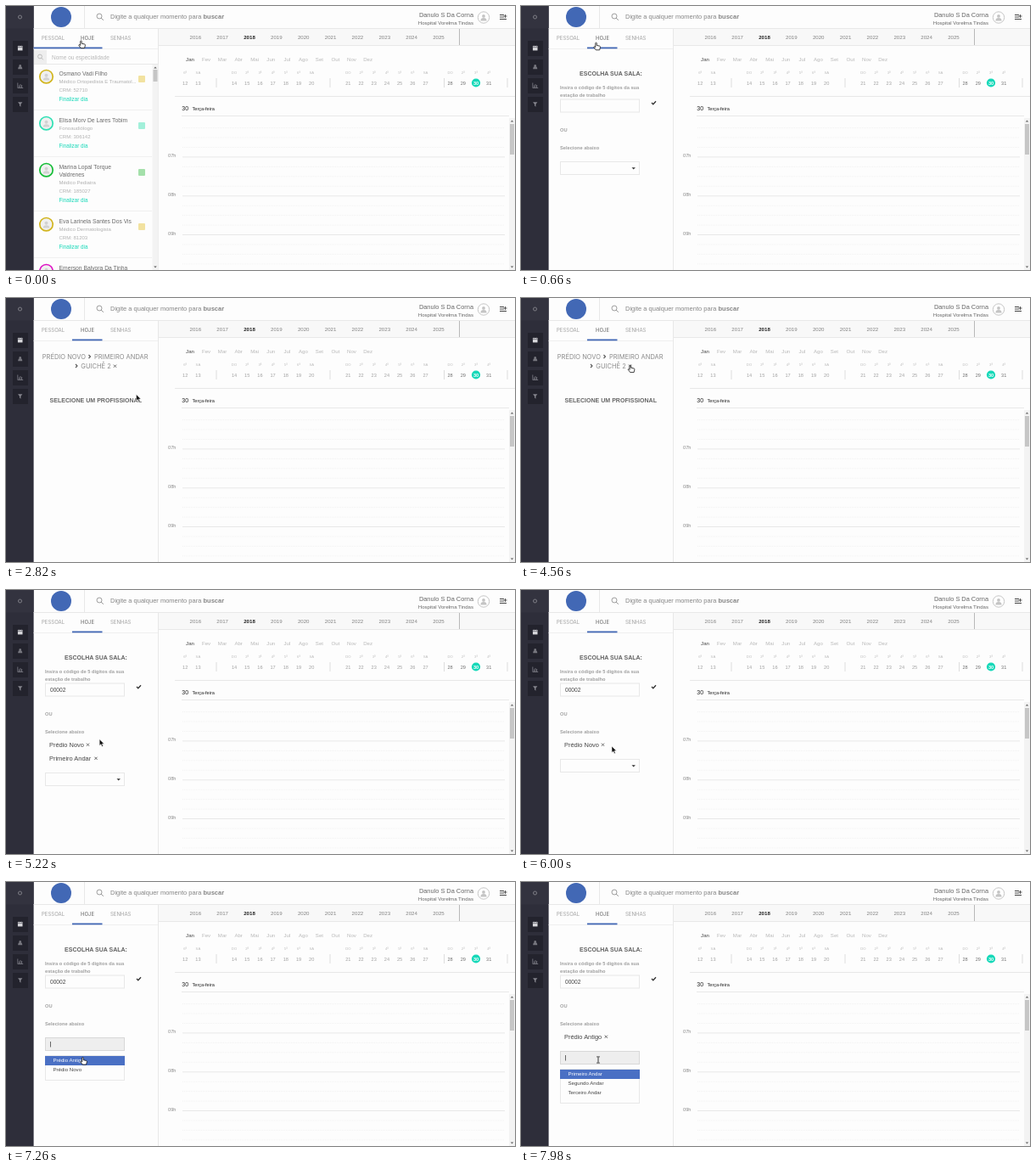
An HTML page that plays this animation: 600 px wide and 311 px high, repeating every 8000 ms.

```html
<!DOCTYPE html>
<html lang="pt-BR">
<head>
<meta charset="utf-8">
<title>Agenda</title>
<style>
  html, body { margin: 0; width: 100%; height: 100%; overflow: hidden; background: #fdfdfd; }
  svg { display: block; width: 100%; height: 100%; font-family: "Liberation Sans", Arial, sans-serif; }
</style>
</head>
<body>
<svg id="stage" viewBox="0 0 600 311">
  <g id="base"></g>
  <g id="panel"></g>
  <rect id="ink" y="48.5" height="1.8" fill="#4268b5"/>
  <g id="cursor"></g>
</svg>
<script>
const LOOP = 8000;
const BLUE = '#4268b5', TEAL = '#14d8b8', RULE = '#e8e8e8', FAINT = '#f0f0f0';
const $ = id => document.getElementById(id);

// ---- markup helpers ----
const text = (x, y, size, fill, str, extra = '') =>
  `<text x="${x}" y="${y}" font-size="${size}" fill="${fill}" ${extra}>${str}</text>`;
const rect = (x, y, w, h, fill, extra = '') =>
  `<rect x="${x}" y="${y}" width="${w}" height="${h}" fill="${fill}" ${extra}/>`;
const path = (d, stroke, width = 1, fill = 'none', extra = '') =>
  `<path d="${d}" stroke="${stroke}" stroke-width="${width}" fill="${fill}" ${extra}/>`;
const circle = (x, y, r, fill, extra = '') =>
  `<circle cx="${x}" cy="${y}" r="${r}" fill="${fill}" ${extra}/>`;
const shape = (d, fill) => path(d, 'none', 0, fill);
const range = (n, fn) => Array.from({ length: n }, (_, i) => fn(i)).join('');
const MID = 'text-anchor="middle"', END = 'text-anchor="end"', BOLD = 'font-weight="700"';
const WIDE = 'font-family="Inter, sans-serif"';

const cross = (x, y) => path(`M${x - 1.6} ${y - 1.6}l3.2 3.2m0 -3.2l-3.2 3.2`, '#666', 1);
const chevron = (x, y) => path(`M${x - 1} ${y - 2}l2 2l-2 2`, '#555', 1.1);
const lens = (x, y, r, color) =>
  circle(x, y, r, 'none', `stroke="${color}" stroke-width=".8"`) +
  path(`M${x + r * .7} ${y + r * .7}l${r * .9} ${r * .9}`, color, .9);
const person = (x, y, s, color) =>
  circle(x, y - 1.6 * s, 1.9 * s, color) +
  shape(`M${x - 3.6 * s} ${y + 4 * s}q0 -3.4 ${3.6 * s} -3.4t${3.6 * s} 3.4z`, color);
const scrollbar = (x, top, thumbY, thumbH) =>
  rect(x, top, 7, 311 - top, '#f3f3f3') + rect(x + 1, thumbY, 5, thumbH, '#c6c6c6') +
  shape(`M${x + 1.7} ${top + 4.5}h3.6l-1.8 -2zM${x + 1.7} 306.5h3.6l-1.8 2z`, '#666');

// ---- fixed parts ----
function sidebar() {
  return rect(0, 0, 32.6, 311, '#2e2e3a') + rect(0, 0, 32.6, 26.5, '#33333f') +
    circle(16.5, 13, 2, 'none', 'stroke="#808088" stroke-width="1"') +
    range(4, i => rect(8, 41 + 22 * i, 18, 18, '#23232d')) +
    rect(13.9, 47, 5.6, 5.4, '#d8d8dc') + path('M13.9 48.6h5.6M15.2 45.8v2M18.2 45.8v2', '#55555f', .7) +
    person(16.7, 71.5, .7, '#77777f') +
    path('M13.8 90.5v6h6.4M15.4 96v-2.5M17 96v-4M18.6 96v-3', '#77777f', .9) +
    shape('M14 113.2h5.4l-2 2.5v3l-1.4 -1.1v-1.9z', '#85858d');
}

function header() {
  return path('M32.6 26.5H600M92.5 0V26', RULE) +
    circle(65, 13, 12, BLUE) +
    lens(110, 12, 3, '#888') +
    text(123, 15.2, 7.53, '#858585', `Digite a qualquer momento para <tspan ${BOLD}>buscar</tspan>`) +
    text(551, 13, 7.4, '#666', 'Danulo S Da Corna', END) +
    text(551, 22, 6.05, '#666', 'Hospital Vorelma Tindas', END) +
    circle(563, 13.5, 6.7, '#fff', 'stroke="#b8b8b8" stroke-width=".8"') +
    person(563, 13.5, 1, '#c4c4c4') +
    path('M582 10.5h5M582 13h5M582 15.5h8', '#444') + path('M586.5 12h4M588.5 10v4', '#444', .9);
}

function tabs() {
  return text(42, 40.3, 6, '#a0a0a0', 'PESSOAL', WIDE) +
    text(88, 40.3, 6, '#666', 'HOJE', WIDE) +
    text(123, 40.3, 6, '#a0a0a0', 'SENHAS', WIDE) +
    path('M32.6 50.5H179', FAINT) + path('M179.5 27V311', RULE);
}

function week(x, firstDay, names, color) {
  return names.map((name, i) => {
    const cx = x + 15.2 * i, day = firstDay + i, today = day === 30;
    return text(cx, 79.5, 4.2, '#bbb', name, MID) +
      (today ? circle(cx, 90.5, 5.1, TEAL) : '') +
      text(cx, 92.6, 5.6, today ? '#fff' : color, day, MID + (today ? ' ' + BOLD : ''));
  }).join('');
}

function calendar() {
  const months = 'Jan Fev Mar Abr Mai Jun Jul Ago Set Out Nov Dez'.split(' ');
  const days = ['DO', '2ª', '3ª', '4ª', '5ª', '6ª', 'SÁ'];
  return rect(180, 27, 420, 19, '#f8f8f8') + path('M180 46.5H600', RULE) +
    range(10, i => text(223.3 + 31.85 * i, 39.3, 6.1, i === 2 ? '#222' : '#808080', 2016 + i,
      MID + (i === 2 ? ' ' + BOLD : ''))) +
    path('M534.5 27V46', '#b8b8b8') +
    months.map((m, i) => text(217 + 19.05 * i, 65.2, 6.1, i ? '#b8b8b8' : '#444', m, MID)).join('') +
    week(211.2, 12, days.slice(5), '#a0a0a0') + week(269, 14, days, '#a0a0a0') +
    week(403.3, 21, days, '#a0a0a0') + week(523.6, 28, days.slice(0, 4), '#707070') +
    path('M248 85v11M382 85v11M516.5 85v11M591 85v11', '#ddd') +
    path('M199 106.5H600', RULE) +
    text(207.3, 123, 7, '#222', '30') + text(219.5, 122.8, 5.6, '#222', 'Terça-feira') +
    path('M207 129.5H593', RULE);
}

function schedule() {
  return range(15, i => {
      const y = 143.6 + 11.45 * i, hour = i % 4 === 3;
      return path(`M208 ${y.toFixed(1)}H588`, hour ? RULE : '#ececec', hour ? 1 : .7, 'none',
        hour ? '' : 'stroke-dasharray="1 1"');
    }) +
    range(3, i => text(200.5, 178.2 + 45.9 * i, 5.7, '#888', `0${7 + i}h`, END)) +
    scrollbar(593, 132, 139, 36);
}

// ---- left panel contents ----
function professional(y, ring, tint, names, role, crm) {
  const below = y + 9 * (names.length - 1);
  return circle(47.5, y + 15.2, 7.7, '#f0f0f0', `stroke="${ring}" stroke-width="1.7"`) +
    person(47.5, y + 15.4, 1.05, '#d2d2d2') +
    names.map((n, i) => text(62.5, y + 13.6 + 9 * i, 6.75, '#6c6c6c', n)).join('') +
    text(62.5, below + 22.8, 6, '#b0b0b0', role) +
    text(62.5, below + 32.8, 6, '#b0b0b0', 'CRM: ' + crm) +
    text(62.5, below + 43.7, 6.3, TEAL, 'Finalizar dia') +
    rect(156, y + 14, 8, 8, tint, 'rx="1"') +
    path(`M33 ${below + 54.5}H172`, FAINT);
}

function professionals() {
  return rect(33, 52, 15, 16, '#eee') + lens(40, 59.5, 2.4, '#b0b0b0') +
    text(54, 62.5, 6.5, '#b8b8b8', 'Nome ou especialidade') + path('M33 68.5H179', RULE) +
    professional(68, '#d2b51e', '#f2e2a0', ['Osmano Vadi Filho'], 'Médico Ortopedista E Traumatol...', '52710') +
    professional(123, '#2ee0b4', '#a2f0da', ['Elisa Morv De Lares Tobim'], 'Fonoaudiólogo', '306142') +
    professional(178, '#14bd36', '#a4e0aa', ['Marina Lopal Torque', 'Valdrenes'], 'Médico Pediatra', '185027') +
    professional(242, '#d2b51e', '#f2e2a0', ['Eva Larinela Santes Dos Vis'], 'Médico Dermatologista', '81203') +
    professional(297, '#de14c4', '#f0a4e4', ['Emerson Balvora Da Tinha'], '', '') +
    scrollbar(172.5, 69, 75, 14);
}

const field = (y, focused) =>
  rect(46.5, y + .5, 93, 15, focused ? '#eee' : '#fdfdfd', `stroke="${focused ? '#d8d8d8' : RULE}"`);

function options(y, items) {
  return rect(46.5, y - .5, 93, 11 * items.length + 7, '#fdfdfd', `stroke="${RULE}"`) +
    rect(46, y, 94, 11, '#4a70c4') +
    items.map((item, i) => text(55.5, y + 7.4 + 11 * i, 6.1, i ? '#444' : '#fff', item)).join('');
}

function roomForm({ code = '', typing = false, tags = [], picking = false, items = [] } = {}) {
  const top = 183 + 16 * tags.length;
  return text(106, 82, 7, '#606060', 'ESCOLHA SUA SALA:', `${MID} ${BOLD}`) +
    text(46, 97.5, 5.7, '#a0a0a0', 'Insira o código de 5 dígitos da sua', BOLD) +
    text(46, 106.6, 5.7, '#a0a0a0', 'estação de trabalho', BOLD) +
    field(109.5, typing) + text(52, 120, 6.6, '#444', code) +
    path('M154 114l1.8 1.8l3.2 -3.6', '#333', 1.3) +
    text(46, 148, 5.7, '#a0a0a0', 'OU', BOLD) +
    text(46, 169, 5.7, '#a0a0a0', 'Selecione abaixo', BOLD) +
    tags.map(([label, x], i) => text(51, 184.6 + 16 * i, 7.45, '#444', label) + cross(x, 182.3 + 16 * i)).join('') +
    field(top, picking) +
    (picking ? path(`M52.5 ${top + 5}v6.5`, '#444', .8)
             : shape(`M130.5 ${top + 7.2}h4.4l-2.2 2.4z`, '#333')) +
    (items.length ? options(top + 22, items) : '');
}

function chosenRoom() {
  const crumb = (x, y, str) => text(x, y, 7.5, '#8a8a8a', str, WIDE);
  return crumb(42.8, 71.6, 'PRÉDIO NOVO') + chevron(98.5, 69) + crumb(104, 71.6, 'PRIMEIRO ANDAR') +
    chevron(83, 80) + crumb(88.3, 82.6, 'GUICHÊ 2') + cross(128.5, 80.2) +
    text(105.8, 122.5, 7.05, '#666', 'SELECIONE UM PROFISSIONAL', `${MID} ${BOLD}`);
}

// ---- timeline: [start ms, value] ----
const code = '00002';
const newBuilding = ['Prédio Novo', 96.5], oldBuilding = ['Prédio Antigo', 100.3], firstFloor = ['Primeiro Andar', 106];
const scenes = [
  [0, professionals()],
  [420, roomForm()],
  [1560, roomForm({ typing: true })],
  ...[...code].map((_, i) => [1680 + 120 * i, roomForm({ typing: true, code: code.slice(0, i + 1) })]),
  [2820, chosenRoom()],
  [4680, roomForm({ code, tags: [newBuilding, firstFloor] })],
  [5520, roomForm({ code, tags: [newBuilding] })],
  [6420, roomForm({ code })],
  [6900, roomForm({ code, picking: true, items: ['Prédio Antigo', 'Prédio Novo'] })],
  [7620, roomForm({ code, tags: [oldBuilding] })],
  [7860, roomForm({ code, tags: [oldBuilding], picking: true,
    items: ['Primeiro Andar', 'Segundo Andar', 'Terceiro Andar'] })]
];

const pointers = {
  arrow: path('M0 0v7.6l1.8 -1.6l1.2 2.8l1.3 -.6l-1.2 -2.6h2.4z', '#fff', .5, '#111'),
  hand: path('M-.8 .4q.8 -.9 1.5 0v2.8l3.6 .8q.7 .3 .6 1.2l-.8 3.4h-4.4l-2.5 -3.4q.3 -1 1.2 -.5l.8 .7z', '#111', .8, '#fff'),
  beam: path('M-1.8 -3.6h1.3l.5 .4l.5 -.4h1.3M0 -3.2v6.4M-1.8 3.6h1.3l.5 -.4l.5 .4h1.3', '#222', .9)
};
const pointerKinds = [
  [0, 'hand'], [740, 'arrow'], [1020, 'beam'], [2490, 'arrow'], [2550, 'hand'], [2820, 'arrow'],
  [4440, 'hand'], [4680, 'arrow'], [5340, 'hand'], [5520, 'arrow'], [6180, 'hand'], [6420, 'arrow'],
  [6840, 'beam'], [7080, 'hand'], [7620, 'beam']
];
const track = [
  [0, 88.5, 41], [600, 88.5, 41], [1200, 91, 117], [2430, 91, 117], [2580, 153.5, 113.5],
  [3840, 153.5, 113.5], [4560, 129, 79], [4740, 129, 79], [5400, 106, 197], [5580, 106, 197],
  [6000, 107, 184], [6300, 96.5, 182], [6660, 96.5, 182], [6900, 92, 191], [7260, 90.5, 206.5],
  [7560, 91, 209.5], [LOOP, 91, 209.5]
];

const clamp = v => Math.min(1, Math.max(0, v));
const at = (steps, t) => steps.findLast(([start]) => start <= t)[1];

function pointerPosition(t) {
  const i = track.findIndex(([time]) => time > t);
  const [t0, x0, y0] = track[i - 1], [t1, x1, y1] = track[i];
  const p = (t - t0) / (t1 - t0), e = p * p * (3 - 2 * p);
  return [x0 + (x1 - x0) * e, y0 + (y1 - y0) * e];
}

const shown = {};
function show(id, markup) {
  if (shown[id] !== markup) $(id).innerHTML = shown[id] = markup;
}

function render(now) {
  const t = now % LOOP;
  show('panel', at(scenes, t));
  show('cursor', pointers[at(pointerKinds, t)]);
  $('cursor').setAttribute('transform', `translate(${pointerPosition(t)})`);
  const left = 32.6 + 45.4 * clamp((t - 40) / 80);
  $('ink').setAttribute('x', left);
  $('ink').setAttribute('width', 113.5 - left);
}

$('base').innerHTML = sidebar() + header() + tabs() + calendar() + schedule();
const started = performance.now();
(function loop() {
  render(performance.now() - started);
  requestAnimationFrame(loop);
})();
</script>
</body>
</html>
```
